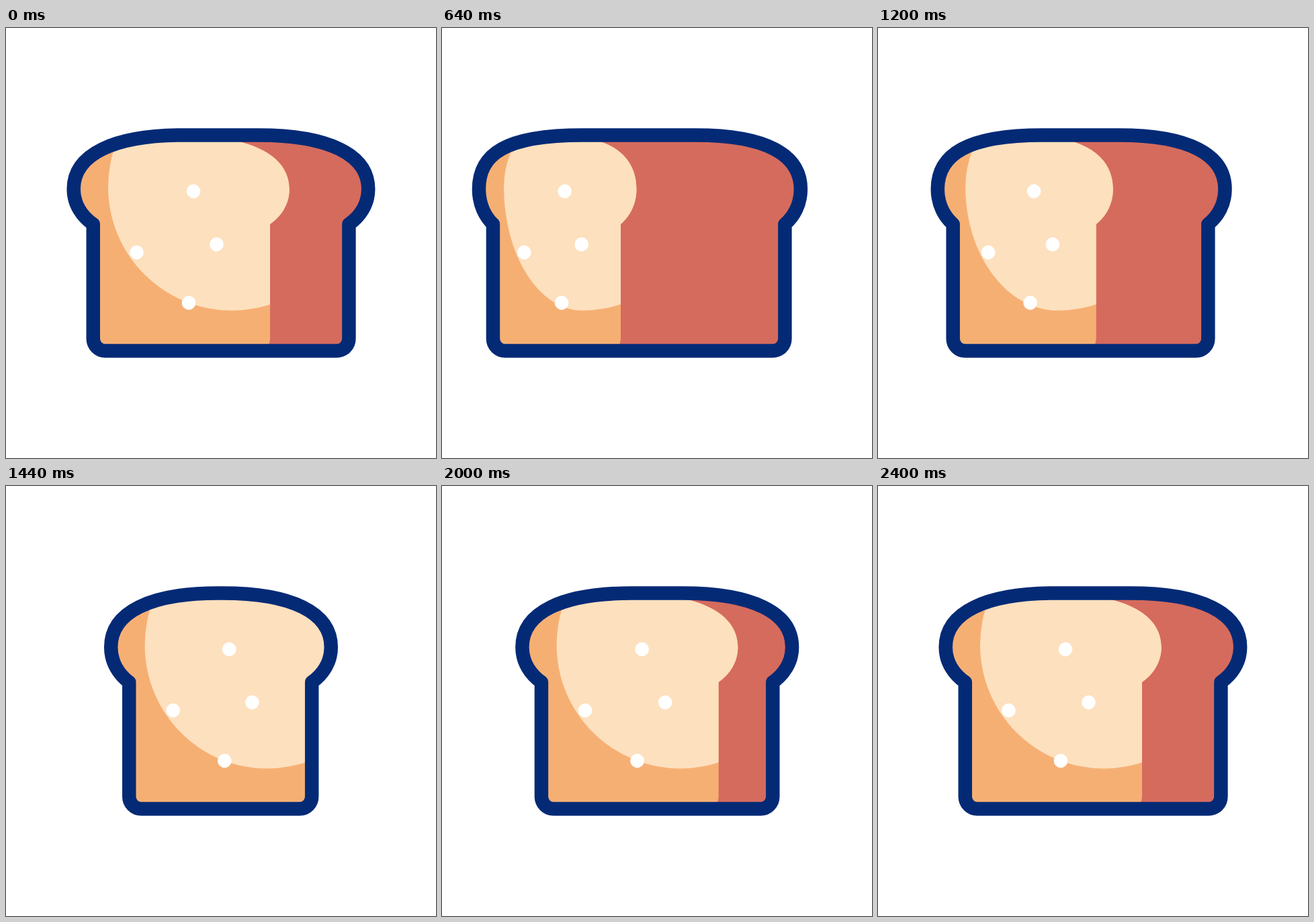
An HTML page that plays this animation: 640 px wide and 640 px high, repeating every 2600 ms.

```html
<!DOCTYPE html>
<html lang="en">
<head>
<meta charset="utf-8">
<title>Bread</title>
<style>
  html, body { margin: 0; width: 100%; height: 100%; overflow: hidden; background: #fff; }
  svg { display: block; width: 100%; height: 100%; }
</style>
</head>
<body>
<svg viewBox="0 0 640 640">
  <defs><clipPath id="slice"><path id="clip"/></clipPath></defs>
  <path id="loaf" fill="#d56b5d"/>
  <path id="face" fill="#f6af73"/>
  <g clip-path="url(#slice)"><path id="light" fill="#fde0be"/></g>
  <g id="dots" fill="#fff">
    <circle r="10.4" cy="243"/>
    <circle r="10.4" cy="334"/>
    <circle r="10.4" cy="322"/>
    <circle r="10.4" cy="409"/>
  </g>
  <path id="outline" fill="none" stroke="#042a76" stroke-width="20.5" stroke-linejoin="round"/>
</svg>
<script>
const LOOP = 2600, STEP = 40;
const TOP = 159.5, MID = 240, NECK = 292, BASE = 480.5, CORNER = 18;
const LIGHT_Y = 236.5, LIGHT_R = 184;

// left/face/right: body edges; bulgeL/R: overhang; join*: where the crown
// flattens; bend*: crown handle length; light*: highlight; dots: offsets from lightX
const rest = {
  left: 129.75, face: 393, right: 510.4, bulgeL: 29.1, bulgeR: 28.8,
  joinL: 264, joinF: 258, joinR: 376, bendL: .63, bendR: .63,
  lightX: 336, lightRx: 184, lightRy: 184, dots: [-57, -141.5, -22.5, -64]
};
const long = {
  left: 74, face: 261.4, right: 510.4, bulgeL: 20.7, bulgeR: 23.3,
  joinL: 207, joinF: 170, joinR: 378, bendL: .75, bendR: .66,
  lightX: 203.7, lightRx: 113.8, lightRy: 122, dots: [-24.5, -84, .2, -29]
};
const single = {
  ...rest, left: 187.2, face: 451.8, right: 453.2, bulgeL: 27.3,
  joinL: 320, joinF: 317, joinR: 320, lightX: 394.8
};
const moves = [
  { from: rest, to: long, start: 200, end: 800 },
  { from: long, to: single, start: 1000, end: 1600 },
  { from: single, to: rest, start: 1720, end: 2380 }
];

const $ = id => document.getElementById(id);
const mix = (a, b, p) => Array.isArray(a) ? a.map((v, i) => mix(v, b[i], p)) : a + (b - a) * p;

// cubic-bezier(.6, 0, .05, 1)
function ease(x) {
  if (x <= 0) return 0;
  if (x >= 1) return 1;
  let lo = 0, hi = 1, u;
  for (let i = 0; i < 30; i++) {
    u = (lo + hi) / 2;
    const v = 1 - u;
    if (3 * u * v * v * .6 + 3 * u * u * v * .05 + u * u * u < x) lo = u; else hi = u;
  }
  return u * u * (3 - 2 * u);
}

function poseAt(t) {
  const m = moves.filter(m => t >= m.start).pop();
  if (!m) return rest;
  const p = ease((t - m.start) / (m.end - m.start)), pose = {};
  for (const k in rest) pose[k] = mix(m.from[k], m.to[k], p);
  return pose;
}

function bread(l, r, bl, br, jl, jr, kl, kr) {
  const xl = l - bl, xr = r + br;
  const crown = MID - .65 * (MID - TOP);
  return `M${l} ${NECK}
    C${l - .55 * bl} 281 ${xl} 263 ${xl} ${MID}
    C${xl} ${crown} ${jl - kl * (jl - xl)} ${TOP} ${jl} ${TOP}
    H${jr}
    C${jr + kr * (xr - jr)} ${TOP} ${xr} ${crown} ${xr} ${MID}
    C${xr} 263 ${r + .55 * br} 281 ${r} ${NECK}
    V${BASE - CORNER} a${CORNER} ${CORNER} 0 0 1 ${-CORNER} ${CORNER}
    H${l + CORNER} a${CORNER} ${CORNER} 0 0 1 ${-CORNER} ${-CORNER}Z`;
}

function glow(x, rx, ry) {
  return `M${x} ${LIGHT_Y - ry}
    A${rx} ${ry} 0 0 0 ${x - rx} ${LIGHT_Y}
    A${rx} ${LIGHT_R} 0 0 0 ${x} ${LIGHT_Y + LIGHT_R}
    A${LIGHT_R} ${LIGHT_R} 0 0 0 ${x + LIGHT_R} ${LIGHT_Y}
    V${LIGHT_Y - ry}Z`;
}

function draw(t) {
  const s = poseAt(t);
  const whole = bread(s.left, s.right, s.bulgeL, s.bulgeR, s.joinL, s.joinR, s.bendL, s.bendR);
  const front = bread(s.left, s.face, s.bulgeL, s.bulgeR, s.joinL, s.joinF, s.bendL, .63);
  $('loaf').setAttribute('d', whole);
  $('outline').setAttribute('d', whole);
  $('face').setAttribute('d', front);
  $('clip').setAttribute('d', front);
  $('light').setAttribute('d', glow(s.lightX, s.lightRx, s.lightRy));
  [...$('dots').children].forEach((dot, i) => dot.setAttribute('cx', s.lightX + s.dots[i]));
}

const begin = performance.now();
function tick() {
  const t = (performance.now() - begin) % LOOP;
  draw(Math.floor(t / STEP) * STEP);
  requestAnimationFrame(tick);
}
tick();
</script>
</body>
</html>
```
